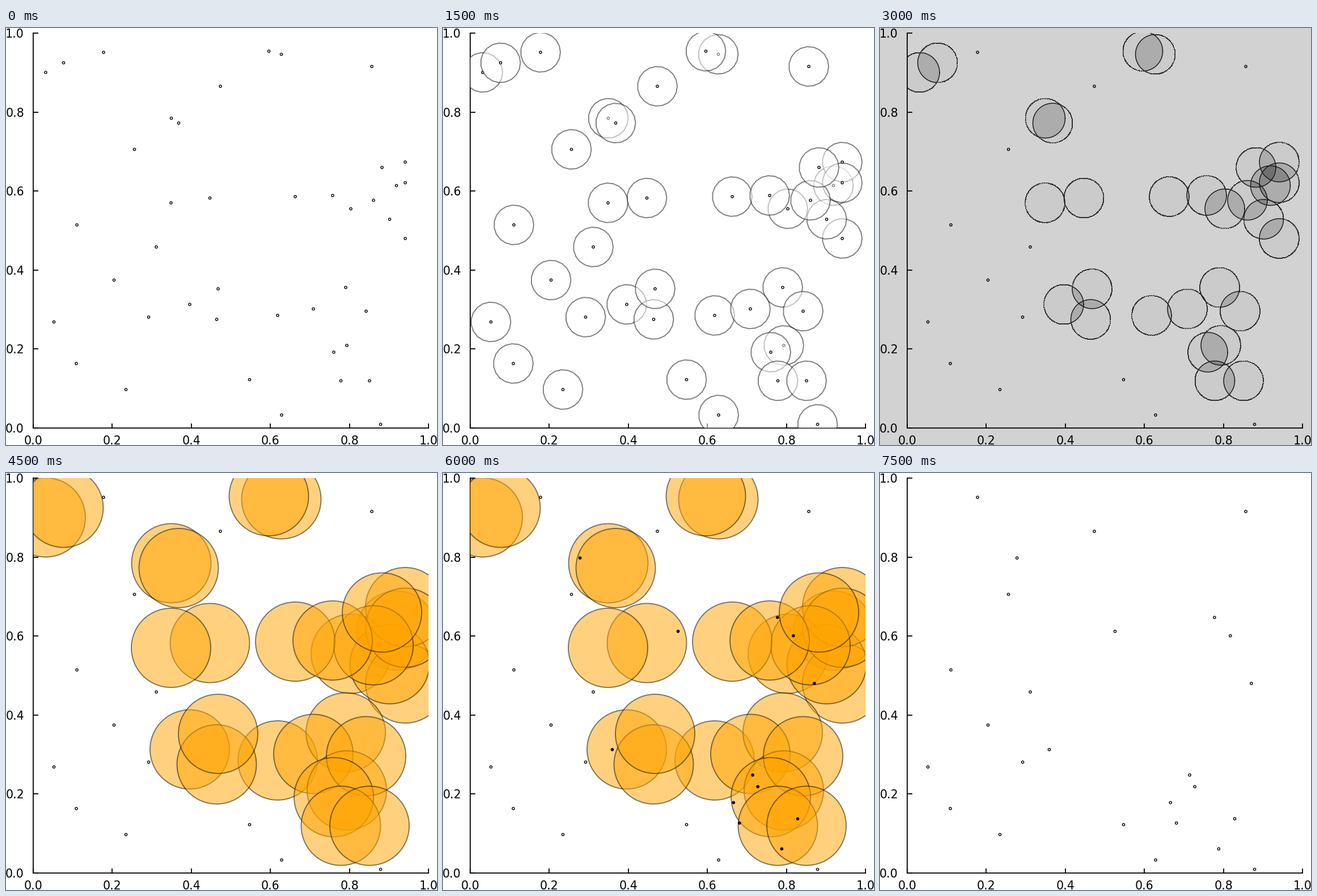
Animation of 760 by 737 pixels, one loop 8 s. Source, as a matplotlib script:

```python
import numpy as np
import matplotlib.pyplot as plt
from matplotlib.animation import FuncAnimation
from matplotlib.patches import Circle, Polygon, Rectangle

W, H, DPI = 760, 737, 64
PT = 72 / DPI                                # points per pixel
LEFT, RIGHT, TOP, BOTTOM = 48, 745, 9.3, 707
SMALL, LARGE = 35, 70
GRAY = "#d2d2d2"
STEP, STAGE = 500, 1500

# Starting sites in pixels, from bottom to top
sites = np.array([
    (70, 78.5), (101.5, 61.5), (172, 43), (485.5, 46.5), (463.5, 41),
    (645, 68), (378, 103), (291.5, 159.5), (304.5, 168), (226.5, 214.5),
    (359.5, 300.5), (291, 309), (125, 348), (265, 387), (190.5, 445.5),
    (688.5, 278.5), (608, 319.5), (704, 372), (676.5, 338), (704, 237),
    (704, 273.5), (648, 304.5), (510, 298), (576, 296), (663, 246.5),
    (479, 508), (324, 488.5), (371.5, 515), (374, 461), (251.5, 511),
    (599, 458.5), (542, 496.5), (601, 561), (635, 500.5), (578, 573),
    (590.5, 623.5), (641, 623.5), (84.5, 519.5), (124, 593), (211.5, 639),
    (429.5, 621.5), (486, 684), (660.5, 700.5)])


def split(points):
    """Separate sites with a neighbour whose small disc meets theirs."""
    gap = np.linalg.norm(points[:, None] - points, axis=2)
    crowded = (gap < 2 * SMALL + 1).sum(axis=1) > 1
    return points[~crowded], points[crowded]


def births(parents, n, rng):
    """Random sites inside the large discs of the parents."""
    out = []
    while len(out) < n:
        r, a = LARGE * np.sqrt(rng.random()), rng.uniform(0, 2 * np.pi)
        x, y = rng.choice(parents) + (r * np.cos(a), r * np.sin(a))
        if LEFT < x < RIGHT and TOP < y < BOTTOM:
            out.append((x, y))
    return out


lone, close = split(sites)
born = births(close, 12, np.random.default_rng(4))

fig = plt.figure(figsize=(W / DPI, H / DPI), dpi=DPI, facecolor="white")
ax = fig.add_axes([0, 0, 1, 1])
ax.axis("off")
frame = Rectangle((LEFT, TOP), RIGHT - LEFT, BOTTOM - TOP, visible=False)
ax.add_patch(frame)

layers = {}
depth = 2


def put(layer, artist):
    """Stack an artist on top and file it under a layer."""
    global depth
    depth += 0.01
    artist.set_zorder(depth)
    layers.setdefault(layer, []).append(artist)
    return artist


def clipped(layer, patch):
    ax.add_patch(patch)
    patch.set_clip_path(frame)
    put(layer, patch)


def dots(layer, points, fill="white"):
    for p in points:
        put(layer, ax.add_patch(Circle(p, 2.1, fc=fill, ec="black", lw=1.4 * PT)))


def ring(p, r, n):
    a = np.arange(n + 1) * 2 * np.pi / n
    return p[0] + r * np.cos(a), p[1] - r * np.sin(a)


def draw_axes():
    style = dict(color="black", lw=1.8 * PT, zorder=1, solid_capstyle="butt")
    ax.plot([LEFT, LEFT], [TOP - 0.9, BOTTOM + 0.9], **style)
    ax.plot([LEFT - 0.9, RIGHT + 0.9], [BOTTOM, BOTTOM], **style)
    text = dict(family="DejaVu Sans", size=20.5 * PT, color="black",
                va="baseline", zorder=1)
    for v in np.linspace(0, 1, 6):
        x = LEFT + v * (RIGHT - LEFT)
        y = BOTTOM - v * (BOTTOM - TOP)
        ax.plot([x, x], [BOTTOM, BOTTOM - 8.5], **style)
        ax.plot([LEFT, LEFT + 8.5], [y, y], **style)
        ax.text(x, 736, f"{v:.1f}", ha="center", **text)
        ax.text(32, y + 8, f"{v:.1f}", ha="right", **text)


def draw_reach():
    """White see-through discs around every site."""
    for p in sites:
        xy = np.column_stack(ring(p, SMALL, 19))
        clipped("reach", Polygon(xy, fc=(1, 1, 1, 0.5), ec=(0, 0, 0, 0.5),
                                 lw=1.9 * PT))
        dots("reach", [p])


def draw_overlap():
    """Gray map of how many discs cover each pixel."""
    back = Rectangle((0, 0), W, H, fc=GRAY, ec="none")
    ax.add_patch(back)
    put("overlap", back).set_zorder(0)

    y, x = np.mgrid[0:H, 0:W] + 0.5
    count = sum(np.hypot(x - px, y - py) < SMALL for px, py in close)
    inside = (x > LEFT) & (x < RIGHT) & (y > TOP) & (y < BOTTOM)
    shade = np.array([210, 203, 172, 136, 112], dtype=np.uint8)
    gray = shade[np.clip(count, 0, 4)]
    alpha = np.where(inside & (count > 0), 255, 0).astype(np.uint8)
    img = ax.imshow(np.dstack([gray, gray, gray, alpha]), aspect="auto",
                    extent=(0, W, H, 0), interpolation="nearest")
    put("overlap", img).set_zorder(0.5)

    outer = dict(color="#303030", lw=1.2 * PT, ls=(0, (1, 1)),
                 dash_capstyle="butt", antialiased=False)
    inner = dict(color="#1c1c1c", lw=1.5 * PT)
    for p in close:
        rx, ry = ring(p, SMALL, 360)
        covers = sum(np.hypot(rx - qx, ry - qy) < SMALL - 0.01
                     for qx, qy in close)
        for mask, style in ((covers == 0, outer), (covers > 0, inner)):
            line, = ax.plot(np.where(mask, rx, np.nan), ry, **style)
            line.set_clip_path(frame)
            put("overlap", line)
    dots("overlap", lone, GRAY)


def draw_groups():
    """Orange discs over the crowded sites."""
    for p in close:
        clipped("groups", Circle(p, LARGE, fc=(1, 165 / 255, 0, 0.5),
                                 ec=(0, 0, 0, 0.5), lw=1.9 * PT))
    dots("groups", lone)


draw_axes()
dots("start", sites)
draw_reach()
draw_overlap()
draw_groups()
dots("born", born, "#0000c0")
dots("end", [*lone, *born])
ax.set(xlim=(0, W), ylim=(H, 0))

stages = [("start",), ("reach",), ("overlap",), ("groups",),
          ("groups", "born"), ("end",)]


def update(i):
    shown = stages[i * STEP // STAGE]
    for name, artists in layers.items():
        for artist in artists:
            artist.set_visible(name in shown)
    return []


anim = FuncAnimation(fig, update, frames=16, interval=STEP, repeat=True,
                     repeat_delay=0, blit=False)
plt.show()
```
